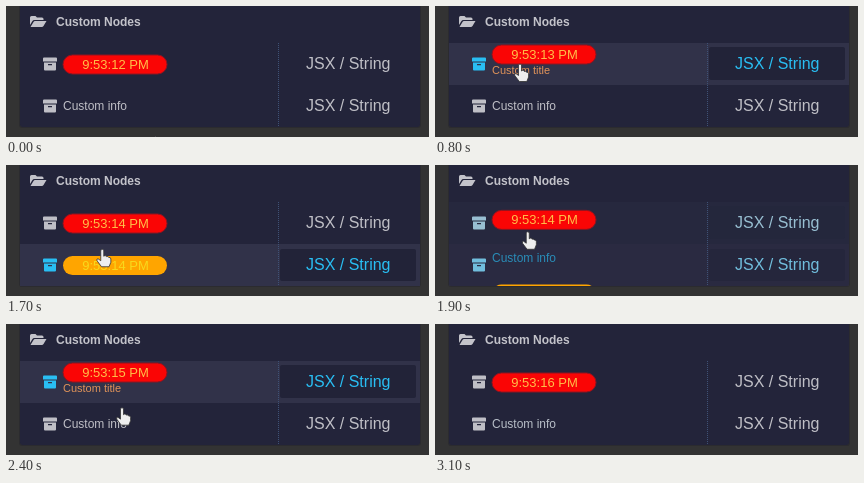
An HTML page that plays this animation: 423x131 px, repeating every 3500 ms.

```html
<!DOCTYPE html>
<html lang="en">
<head>
<meta charset="utf-8">
<title>Custom Nodes</title>
<style>
  html, body { margin: 0; width: 100%; height: 100%; overflow: hidden; background: #333; }
  svg { display: block; width: 423px; height: 131px; }
  text { font: 12px "Liberation Sans", Arial, sans-serif; }
  .heading { font-weight: bold; fill: #c3c3ca; }
  .type { font-size: 16px; }
  .time { font-size: 13px; text-anchor: middle; }
  .title { font-size: 11px; fill: #e0935a; }
  .split { stroke: #3f5276; stroke-dasharray: 1 1; }
</style>
</head>
<body>
<svg viewBox="0 0 423 131">
  <defs>
    <clipPath id="clip1"><rect x="14" y="37" width="400" height="42"/></clipPath>
    <clipPath id="clip2"><rect x="14" y="79" width="400" height="42"/></clipPath>
    <clipPath id="clipTitle"><rect x="57" y="37" width="104" height="42"/></clipPath>
    <path id="archive" fill-rule="evenodd"
      d="M1 0h12q1 0 1 1v3h-14v-3q0-1 1-1zM1 5h12v7q0 1-1 1h-10q-1 0-1-1zM5 6.500v1.200h4v-1.200z"/>
    <rect id="pill" x="57" y="-9.5" width="104" height="19" rx="9.5"/>
  </defs>

  <rect width="423" height="131" fill="#333"/>
  <path d="M13 0h402v119q0 3-3 3h-396q-3 0-3-3z" fill="#2b2b2f"/>
  <path d="M14 0h400v118q0 3-3 3h-394q-3 0-3-3z" fill="#23243a"/>

  <g fill="#c3c3ca">
    <path d="M24 19v-7.500q0-1.500 1.500-1.500h4l1.500 1.500h5q1.500 0 1.500 1.500v1h-9q-1.500 0-2.200 1.200z"/>
    <path d="M24.500 21l3-5q.5-1 1.500-1h11.500l-3 5q-.6 1-1.700 1z"/>
  </g>
  <text class="heading" x="50" y="20">Custom Nodes</text>

  <g id="row1" clip-path="url(#clip1)">
    <rect class="glow" x="14" y="37" width="400" height="42" fill="#313249"/>
    <rect class="glow" x="274" y="41" width="136" height="33" rx="2" fill="#222338"/>
    <use class="tint" href="#archive" x="37" y="51.500"/>
    <text class="tint type" x="300" y="63">JSX / String</text>
    <g clip-path="url(#clipTitle)"><text id="title" class="title" x="57" y="68">Custom title</text></g>
    <g id="redPill">
      <use href="#pill" fill="#fa0505" stroke="#8f1420"/>
      <text class="time" x="109.500" y="4.500" fill="#ffbe48"></text>
    </g>
  </g>

  <g id="row2" clip-path="url(#clip2)">
    <rect class="glow" x="14" y="79" width="400" height="42" fill="#313249"/>
    <rect class="glow" x="274" y="84" width="136" height="32" rx="2" fill="#222338"/>
    <use class="tint" href="#archive" x="37" y="93.500"/>
    <text class="tint type" x="300" y="105">JSX / String</text>
    <text id="info" x="57" y="104">Custom info</text>
    <g id="orangePill">
      <use href="#pill" fill="#ffa500"/>
      <text class="time" x="109.500" y="4.500" fill="#f8d81c"></text>
    </g>
  </g>

  <path class="split" d="M272.500 37v84"/>

  <g id="cursor">
    <path id="hand" fill="#eee" stroke="#333" stroke-width=".8" stroke-linejoin="round"
      d="M-1.500 1q1.500-2 3 0v6l1-.6q1.500-.3 1.700 1q1.700-.7 2.200.8q2-.4 2.200 1.500v3.300l-1.800 4.500h-7.500l-4.500-6q-.8-2 1-2l2.700 2z"/>
    <path id="arrow" fill="#2a262b" stroke="#d8ced8" stroke-width="1.3" d="M0 0v12l3-2.500l2 4.500l2-1l-2-4.200h4z"/>
  </g>
</svg>

<script>
const LOOP = 3500, STEP = 100, FADE = 300;
const PANEL_BOTTOM = 121;
const GREY = [191, 191, 198], CYAN = [41, 190, 243];
const $ = id => document.getElementById(id);

// The pointer goes straight from each place to the next.
const below = { x: 150, y: 132 }, title = { x: 85, y: 58 }, info = { x: 98, y: 93 };
const back = { x: 91, y: 58 }, exit = { x: 166, y: 135 };
const moves = [
  { start: 100, end: 500, from: below, to: title },
  { start: 800, end: 1200, from: title, to: info },
  { start: 1600, end: 2000, from: info, to: back },
  { start: 2200, end: 2800, from: back, to: exit },
];
const visits1 = [{ enter: 250, leave: 1000 }, { enter: 1800, leave: 2640 }];
const visits2 = [{ enter: 1050, leave: 1700 }, { enter: 2450, leave: 2490 }];

const clamp = k => Math.min(1, Math.max(0, k));
const smooth = k => (k = clamp(k), k * k * (3 - 2 * k));

// Eased hover amount: rises after each enter, falls after each leave.
const hover = (t, visits, fade = FADE) => visits.reduce((sum, v) =>
  sum + smooth((t - v.enter) / fade) - smooth((t - v.leave) / fade), 0);

function pointer(t) {
  const { start, end, from, to } = moves.findLast(m => t >= m.start) || moves[0];
  const k = clamp((t - start) / (end - start));
  return { x: from.x + (to.x - from.x) * k, y: from.y + (to.y - from.y) * k };
}

const tint = k => `rgb(${GREY.map((g, i) => Math.round(g + (CYAN[i] - g) * k))})`;
const move = (el, x, y) => el.setAttribute("transform", `translate(${x} ${y})`);

function light(row, k) {
  row.querySelectorAll(".glow").forEach(el => el.style.opacity = k);
  row.querySelectorAll(".tint").forEach(el => el.style.fill = tint(k));
}

function drawTitleRow(t) {
  const lift = hover(t, visits1);
  const titleVisits = visits1.map(v => ({ enter: v.enter + 100, leave: v.leave - 150 }));
  const shown = hover(t, titleVisits, 250);
  light($("row1"), lift);
  move($("redPill"), 0, 58.5 - lift * (14 - 4 * shown));
  move($("title"), -60 * (1 - shown), 0);
  $("title").style.opacity = shown;
}

function drawInfoRow(t) {
  const swap = hover(t, visits2);
  const glow = clamp(2 * swap);
  light($("row2"), glow);
  move($("info"), 0, -26 * swap);
  $("info").style.fill = tint(Math.max(glow, hover(t - 350, visits2)));
  $("info").style.opacity = clamp(1 - 1.3 * swap);
  move($("orangePill"), 0, 100.5 + 52 * (1 - swap) ** 2);
}

function drawCursor(t) {
  const { x, y } = pointer(t);
  const inside = y < PANEL_BOTTOM;
  move($("cursor"), x, y);
  $("hand").style.display = inside ? "" : "none";
  $("arrow").style.display = inside ? "none" : "";
}

function draw(t) {
  const second = 12 + Math.floor((t + 900) / 1000);
  document.querySelectorAll(".time").forEach(el => el.textContent = `9:53:${second} PM`);
  drawTitleRow(t);
  drawInfoRow(t);
  drawCursor(t);
}

const start = performance.now();
function tick() {
  const t = (performance.now() - start) % LOOP;
  draw(Math.floor(t / STEP) * STEP);
  requestAnimationFrame(tick);
}
tick();
</script>
</body>
</html>
```
